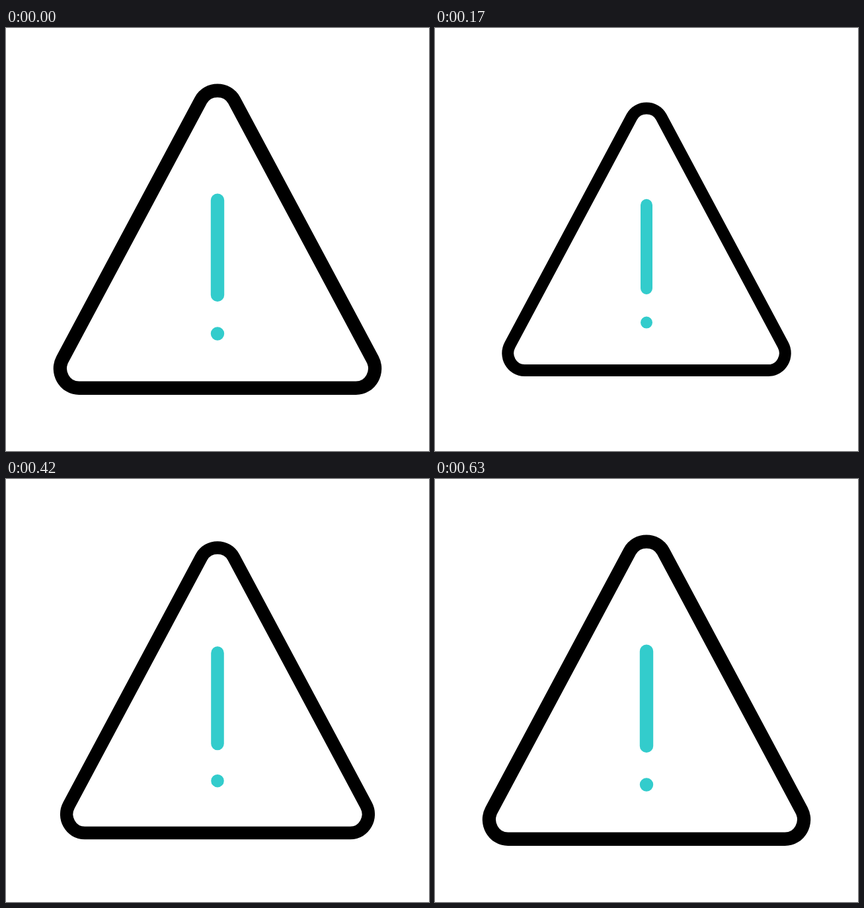
These frames come from a looping animation (640x640 px, 1540 ms). An HTML page:

```html
<!DOCTYPE html>
<html lang="en">
<head>
<meta charset="utf-8">
<title>Warning sign</title>
<style>
  html, body { margin: 0; height: 100%; overflow: hidden; background: #fff; }
  svg { display: block; width: 100%; height: 100%; }
  path { fill: none; stroke-width: 20.4; stroke-linecap: round; }
</style>
</head>
<body>
<svg viewBox="-320 -320 640 640">
  <g id="sign">
    <path stroke="#000" d="M-25.3-210.5C-14.8-230.1 14.8-230.1 25.3-210.5L234.5 181
      C244.9 200.4 231.5 224.8 209.5 224.8H-209.5C-231.5 224.8-244.9 200.4-234.5 181Z"/>
    <path stroke="#3cc" d="M0-59.3V83.9M0 142.5h.01"/>
  </g>
</svg>
<script>
  const LOOP = 1540;
  // [step, scale] with 24 steps per second
  const keys = [[0, 1], [2, .911], [4, .881], [8, .9], [10, .959], [12, .9735], [15, 1]];
  const sign = document.getElementById('sign');

  function slope(i) {
    const a = keys[Math.max(i - 1, 0)];
    const b = keys[Math.min(i + 1, keys.length - 1)];
    return (b[1] - a[1]) / (b[0] - a[0]);
  }

  // Smooth cubic curve through the keys
  function scaleAt(step) {
    const i = keys.findIndex(k => k[0] > step) - 1;
    if (i < 0) return 1;
    const [x0, y0] = keys[i], [x1, y1] = keys[i + 1];
    const w = x1 - x0, u = (step - x0) / w, v = 1 - u;
    return y0 * v * v * (1 + 2 * u) + y1 * u * u * (3 - 2 * u)
      + w * u * v * (slope(i) * v - slope(i + 1) * u);
  }

  function draw() {
    const t = performance.now() % LOOP;
    // Steps start on whole hundredths of a second
    const step = Math.floor((Math.floor(t / 10) + .49) * .24);
    sign.setAttribute('transform', `scale(${scaleAt(step)})`);
    requestAnimationFrame(draw);
  }
  draw();
</script>
</body>
</html>
```
